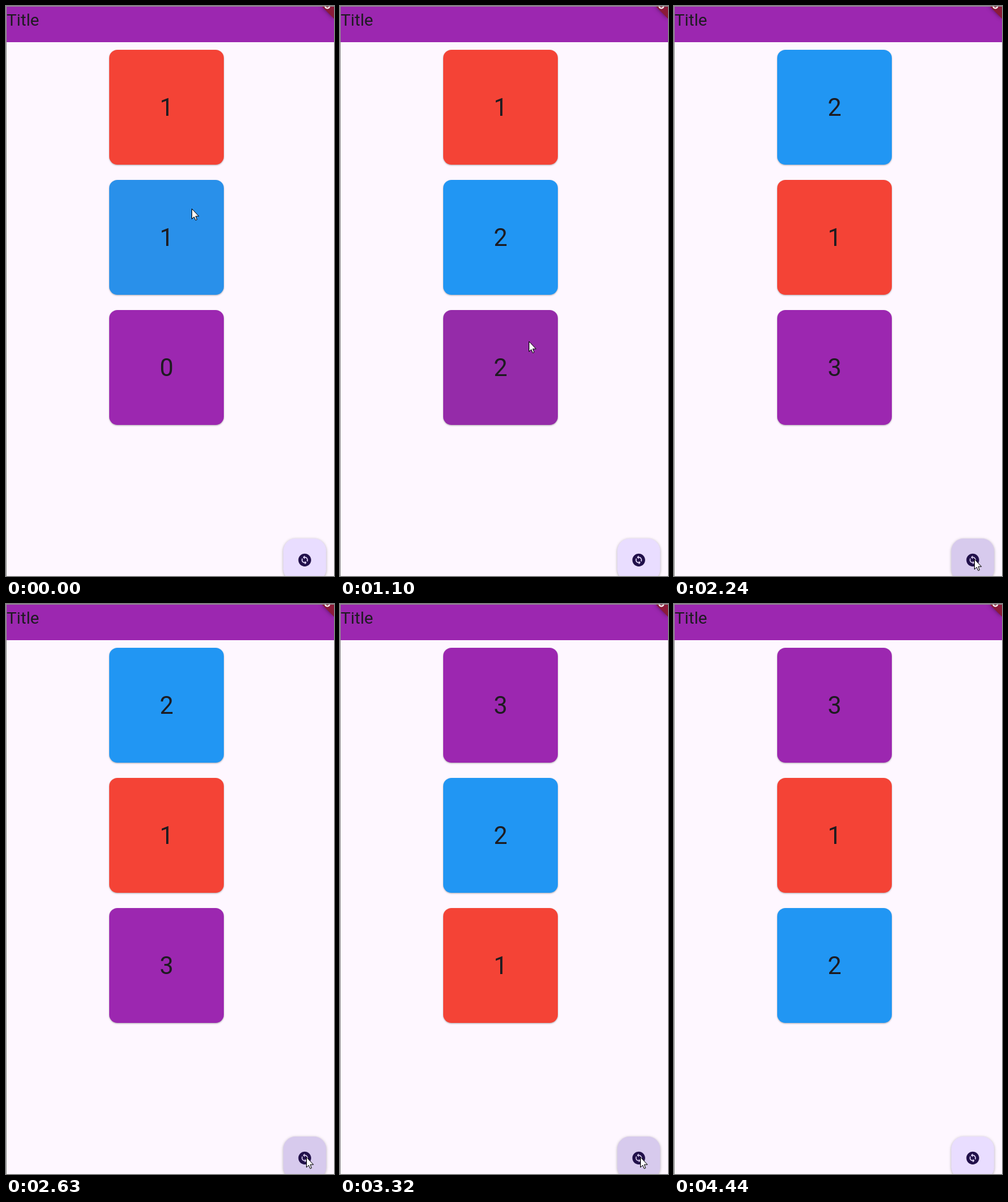
Animation, 518 px wide and 898 px high, one loop 5.02 s. Source, as an HTML page:

```html
<!DOCTYPE html>
<html lang="en">
<head>
<meta charset="utf-8">
<title>Counter cards</title>
<style>
  html, body { margin: 0; width: 100%; height: 100%; overflow: hidden; background: #fef7ff; }
  svg { display: block; }
  text { font-family: Roboto, sans-serif; fill: #1d1b20; }
  .card { filter: drop-shadow(0 1px 1px rgba(0, 0, 0, .3)); }
  .number { font-size: 38.6px; text-anchor: middle; }
  #fab { filter: drop-shadow(0 1px 2px rgba(0, 0, 0, .3)); }
  #banner { filter: drop-shadow(0 0 3px rgba(0, 0, 0, .5)); }
</style>
</head>
<body>
<svg width="518" height="898" viewBox="0 0 518 898">
  <defs>
    <clipPath id="inkArea">
      <rect x="163" y="479" width="181" height="181" rx="13"/>
      <rect x="438" y="839" width="67.6" height="67.6" rx="19.3"/>
    </clipPath>
  </defs>
  <rect width="518" height="898" fill="#fef7ff"/>
  <rect width="518" height="57" fill="#9c27b0"/>
  <path id="banner" d="M498 0H518V20Z" fill="#8b1a38"/>
  <path d="M503.5 0Q505 4 508 3.5T511 0" fill="none" stroke="#fff" stroke-width="2"/>
  <path d="M0 .5H518M.5 0V898" stroke="#929292" fill="none"/>
  <text x="1" y="31" font-size="26.5">Title</text>
  <g id="cards"></g>
  <rect id="fab" x="438" y="839" width="67.6" height="67.6" rx="19.3"/>
  <circle id="ripple" clip-path="url(#inkArea)" fill="#302048"/>
  <g id="numbers"></g>
  <path transform="translate(471.8 872.8) scale(1.01) translate(-12 -12)" fill="#21104a" d="M12 2C6.48 2 2 6.48 2 12s4.48 10 10 10 10-4.48 10-10S17.52 2 12 2zm.06 17v-2.01H12c-1.28 0-2.56-.49-3.54-1.46-1.71-1.71-1.92-4.35-.64-6.29l1.1 1.1c-.71 1.33-.53 3.01.59 4.13.7.7 1.62 1.03 2.54 1.01v-2.14l2.83 2.83L12.06 19zm4.11-4.24l-1.1-1.1c.71-1.33.53-3.01-.59-4.13C13.79 8.84 12.9 8.5 12 8.5h-.06v2.15L9.11 7.83 11.94 5v2.02c1.3-.02 2.61.45 3.6 1.45 1.7 1.7 1.91 4.35.63 6.29z"/>
  <path id="cursor" d="M.5 .5V16.5L4 13.2 6.4 18.5 8.6 17.6 6.5 12.2H11.5Z" fill="#fff" stroke="#000"/>
</svg>
<script>
const LOOP = 5020;
const POINTER_STEP = 120;
const FAB_ENTER = 2240, FAB_LEAVE = 4130;

const cards = {
  red: { fill: '#f44336', hover: '#f44336', count: 1, taps: [] },
  blue: { fill: '#2196f3', hover: '#2990ea', count: 1, taps: [140] },
  purple: { fill: '#9c27b0', hover: '#952ba9', count: 0, taps: [650, 1100, 1370] },
};
// Each shuffle exchanges the cards in two slots.
const swaps = [
  { time: 2240, a: 0, b: 1 }, { time: 2890, a: 0, b: 1 },
  { time: 3320, a: 0, b: 2 }, { time: 3740, a: 1, b: 2 },
];
const moves = [
  { start: 140, duration: 240, x: 298, y: 528 },
  { start: 1370, duration: 600, x: 474, y: 871 },
  { start: 4010, duration: 360, x: 479, y: 898 },
];
const splashes = [
  { start: 650, duration: 450, r: 89 }, { start: 1230, duration: 140, r: 11 },
  { start: 2770, duration: 120, r: 27 }, { start: 3620, duration: 120, r: 11 },
];

const byId = id => document.getElementById(id);
const easeOut = u => 1 - (1 - u) ** 2;
const slotY = i => 69 + 205 * i;

function set(el, attrs) {
  for (const key in attrs) el.setAttribute(key, attrs[key]);
  return el;
}

function add(parent, tag, attrs) {
  const el = document.createElementNS('http://www.w3.org/2000/svg', tag);
  return byId(parent).appendChild(set(el, attrs));
}

const slots = [0, 1, 2].map(i => ({
  card: add('cards', 'rect', { class: 'card', x: 163, y: slotY(i), width: 181, height: 181, rx: 13 }),
  number: add('numbers', 'text', { class: 'number', x: 253.5, y: slotY(i) + 104 }),
}));

function pointerAt(t) {
  let x = 293, y = 319;
  for (const move of moves) {
    const steps = Math.max(0, Math.floor((t - move.start) / POINTER_STEP));
    const k = easeOut(Math.min(1, steps * POINTER_STEP / move.duration));
    x += (move.x - x) * k;
    y += (move.y - y) * k;
  }
  return { x, y };
}

function orderAt(t) {
  const order = Object.values(cards);
  for (const { time, a, b } of swaps) {
    if (time <= t) [order[a], order[b]] = [order[b], order[a]];
  }
  return order;
}

function draw(t) {
  const { x, y } = pointerAt(t);
  orderAt(t).forEach((card, i) => {
    const top = slotY(i);
    const hovered = x > 163 && x < 344 && y > top && y < top + 181;
    set(slots[i].card, { fill: hovered ? card.hover : card.fill });
    slots[i].number.textContent = card.count + card.taps.filter(time => time <= t).length;
  });

  const onFab = t >= FAB_ENTER && t < FAB_LEAVE;
  set(byId('fab'), { fill: onFab ? '#d7caed' : '#e9ddff' });
  set(byId('cursor'), { transform: `translate(${Math.round(x)} ${Math.round(y)})` });

  const splash = splashes.find(s => t >= s.start && t < s.start + s.duration);
  const opacity = splash ? .1 * (1 - (t - splash.start) / splash.duration) : 0;
  set(byId('ripple'), { cx: x, cy: y, r: splash ? splash.r : 0, opacity });
}

const start = performance.now();
function tick() {
  draw((performance.now() - start) % LOOP);
  requestAnimationFrame(tick);
}
tick();
</script>
</body>
</html>
```
